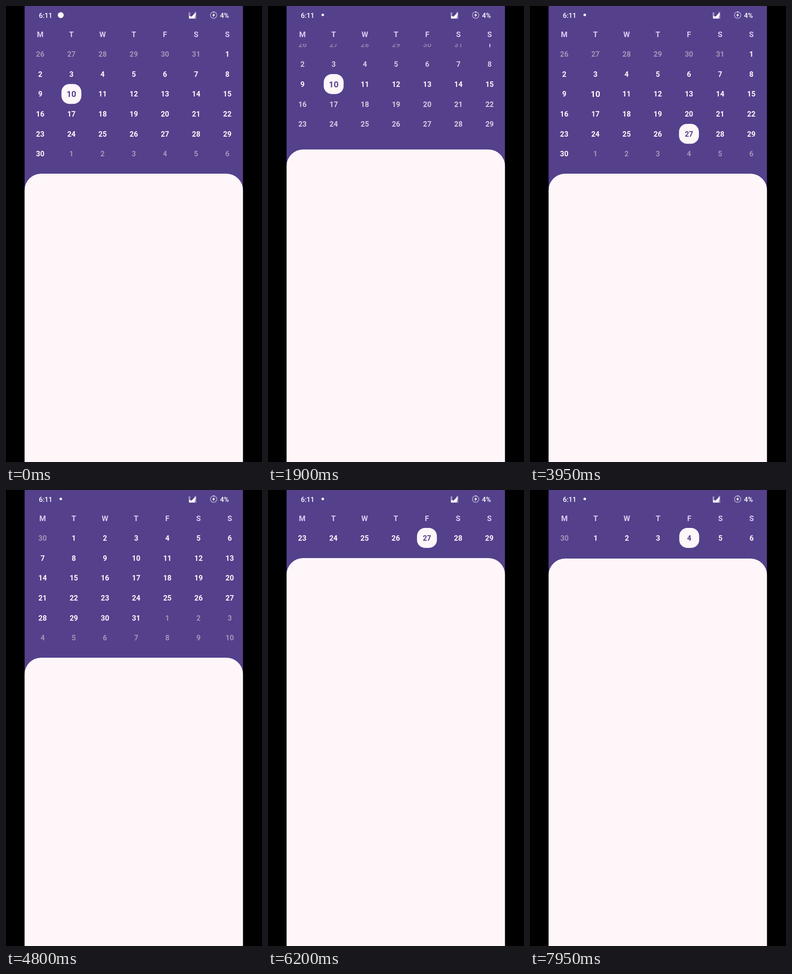
An HTML page with a canvas for the animation above (8 s loop, 561 by 998 pixels).

```html
<!DOCTYPE html>
<html lang="en">
<head>
<meta charset="utf-8">
<title>Collapsing calendar</title>
<style>
  html, body { margin: 0; width: 100%; height: 100%; overflow: hidden; background: #000; }
  canvas { display: block; }
</style>
</head>
<body>
<canvas id="stage" width="561" height="998"></canvas>
<script>
const ctx = document.getElementById('stage').getContext('2d');
const LOOP = 8000, STEP = 50;
const PURPLE = '#55408c', PAPER = '#fff6f9', DIM = '#a592b5', WEEKDAY = '#d9ccf0';
const LEFT = 40.5, WIDTH = 479, COL0 = 75, COL = 68.33, ROW0 = 105.6, ROW = 43.6;
const MONTH_TOP = 367, WEEK_TOP = 149;

// lead: grid index of day 1
const months = [
  { lead: 6, previous: 31, length: 30, today: 15 },
  { lead: 1, previous: 30, length: 31, today: -1 }
];

// [start, duration, sharpness, end value]
const collapseMoves = [
  [1000, 450, 1.77, 1], [1750, 300, 3.5, 0],
  [2350, 300, 3.5, 1], [2750, 150, 2, 0],
  [6050, 150, 2, 1], [7940, 250, 2, 0]
];
const pageMoves = [[4450, 500, 5, 1], [4950, 600, 5, 0], [6700, 450, 4, 1]];

function ease(u, sharpness) {
  u = Math.min(1, Math.max(0, u));
  return 1 - (1 - u) ** sharpness * (1 + sharpness * u);
}

function track(moves, t) {
  let value = 0;
  for (const [start, duration, sharpness, end] of moves) {
    value += (end - value) * ease((t - start) / duration, sharpness);
  }
  return value;
}

function label(text, x, y, size, color, weight = 700, align = 'center') {
  ctx.font = `${weight} ${size}px Roboto, sans-serif`;
  ctx.textAlign = align;
  ctx.fillStyle = color;
  ctx.fillText(text, x, y + size * 0.356);
}

function shape(color, build) {
  ctx.fillStyle = color;
  ctx.beginPath();
  build();
  ctx.fill();
}

const circle = (color, x, y, r) => shape(color, () => ctx.arc(x, y, r, 0, 2 * Math.PI));

function polygon(color, ...points) {
  shape(color, () => points.forEach(([x, y]) => ctx.lineTo(x, y)));
}

function dayAt(month, index) {
  const day = index - month.lead + 1;
  if (day < 1) return { day: day + month.previous, inside: false };
  if (day > month.length) return { day: day - month.length, inside: false };
  return { day, inside: true };
}

function drawPage(month, offset, collapse, selected, focusRow, sheetTop) {
  const nudge = collapse > 0 && collapse < 1 ? 0.6 : 0;
  const lift = collapse > 0 ? 0.4 : 0;
  const columnX = c => COL0 + COL * c + offset + nudge;

  [...'MTWTFSS'].forEach((letter, c) => label(letter, columnX(c), 62.2 - lift, 16.5, WEEKDAY));

  ctx.save();
  ctx.beginPath();
  ctx.rect(LEFT, 83, WIDTH, sheetTop - 21.5 - 83);
  ctx.clip();
  for (let i = 0; i < 42; i++) {
    const row = Math.floor(i / 7), x = columnX(i % 7);
    const y = ROW0 + ROW * (row - focusRow * collapse) - lift;
    ctx.globalAlpha = row === focusRow ? 1 : 1 - collapse;
    if (i === selected) {
      shape(PAPER, () => ctx.roundRect(x - 21.8, y - 22.1, 43.6, 43.6, 17.5));
    }
    const { day, inside } = dayAt(month, i);
    const color = i === selected ? PURPLE : inside ? PAPER : DIM;
    label(day, x, y, i === month.today ? 18.5 : 16, color);
  }
  ctx.restore();
}

function drawStatusBar(t) {
  label('6:11', 72, 20.5, 15, '#fff', 500, 'left');
  const shrink = Math.min(1, t / 200);
  circle('#fff', 120, 20 - 0.5 * shrink, 6.5 - 3.7 * shrink);

  ctx.fillStyle = '#9a8cbb';
  ctx.fillRect(400, 14, 4, 9);
  ctx.fillRect(413, 13, 4, 15);
  polygon('#fff', [401, 22], [407, 23], [414, 15.5], [416, 17], [413, 27.5], [401, 27.5]);

  ctx.strokeStyle = '#a195c4';
  ctx.lineWidth = 2;
  ctx.beginPath();
  ctx.arc(455, 20, 7, 0, 2 * Math.PI);
  ctx.stroke();
  ctx.fillStyle = '#fff';
  ctx.fillRect(454, 12, 2.4, 2);
  polygon('#fff', [456.5, 15.5], [451.5, 20.5], [454.5, 20.5], [453.5, 24.5], [458.5, 19.2], [455.5, 19.2]);
  label('4%', 469, 20.5, 15, '#fff', 500, 'left');
}

function draw(t) {
  const collapse = track(collapseMoves, t);
  const page = track(pageMoves, t);
  const sheetTop = MONTH_TOP + (WEEK_TOP - MONTH_TOP) * collapse;
  const selection = [t < 3950 ? 15 : 32, t < 7350 ? -1 : 4];

  ctx.fillStyle = '#000';
  ctx.fillRect(0, 0, 561, 998);
  ctx.save();
  ctx.beginPath();
  ctx.rect(LEFT, 0, WIDTH, 998);
  ctx.clip();
  ctx.fillStyle = PURPLE;
  ctx.fillRect(LEFT, 0, WIDTH, 998);

  months.forEach((month, i) => {
    if (Math.abs(i - page) >= 1) return;
    const focusRow = Math.max(0, Math.floor(selection[i] / 7));
    drawPage(month, (i - page) * WIDTH, collapse, selection[i], focusRow, sheetTop);
  });

  shape(PAPER, () => ctx.roundRect(LEFT, sheetTop, WIDTH, 1000, [36.5, 36.5, 0, 0]));
  drawStatusBar(t);
  ctx.restore();
}

const began = performance.now();
function tick() {
  const t = (performance.now() - began) % LOOP;
  draw(Math.floor(t / STEP) * STEP);
  requestAnimationFrame(tick);
}
tick();
</script>
</body>
</html>
```
